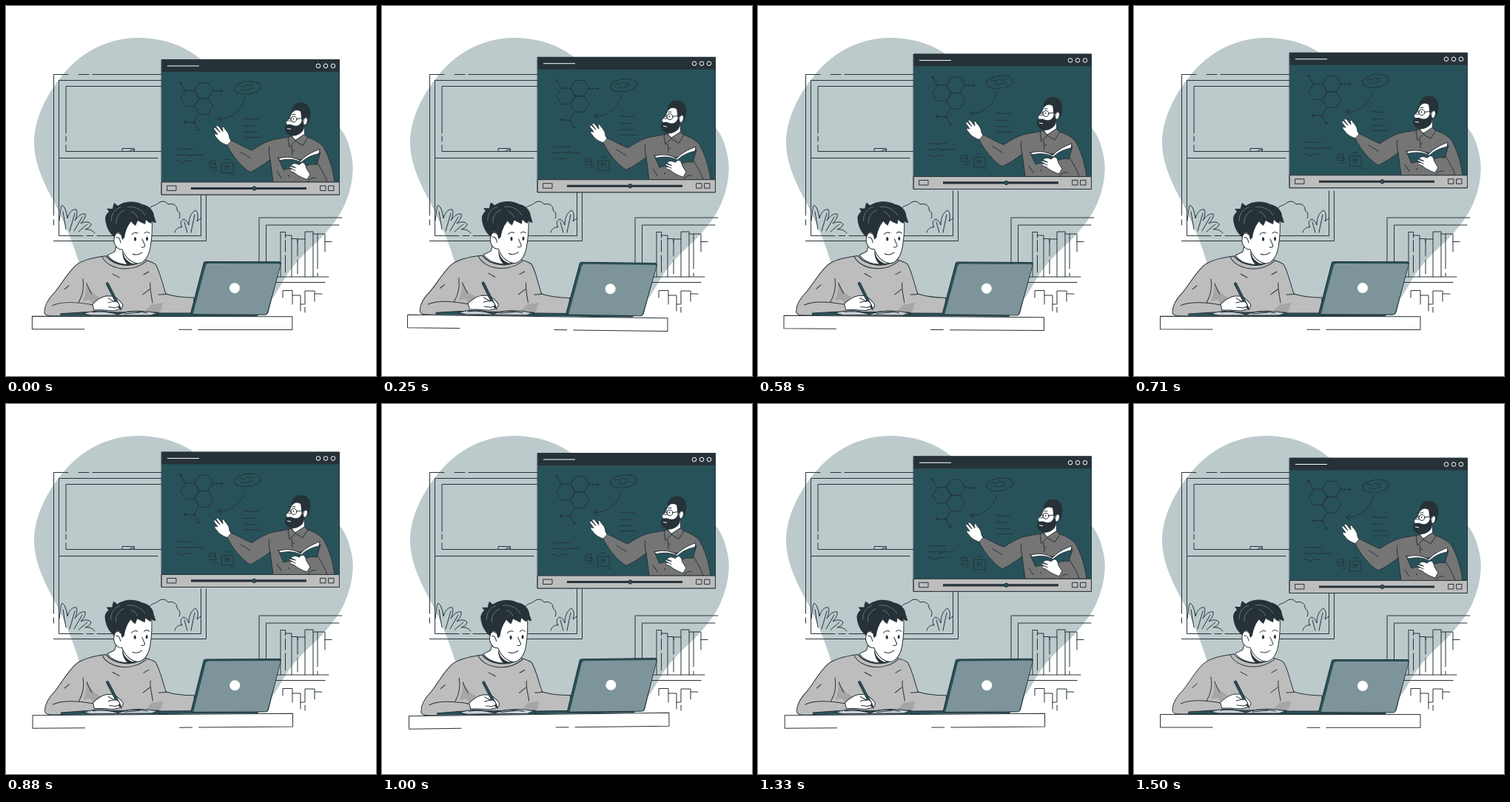
Write an HTML page that moves like this. It is 500 by 500 pixels and loops after 1540 ms.

```html
<!DOCTYPE html>
<html lang="en">
<head>
<meta charset="utf-8">
<title>Online lesson</title>
<style>
html, body { margin: 0; width: 100%; height: 100%; overflow: hidden; background: #fff; }
svg { display: block; width: 100vw; height: 100vh; }
.l { fill: none; stroke: #263238; stroke-width: 1; stroke-linecap: round; stroke-linejoin: round; }
.o { stroke: #263238; stroke-width: 1; stroke-linejoin: round; stroke-linecap: round; }
.w { fill: #fff; }
.d { fill: #263238; }
.t { fill: #28525a; }
.g { fill: #bdbdbd; }
.s { fill: #757575; }
.sh { fill: #a6a6a6; }
.p { fill: #c8d0d2; }
</style>
</head>
<body>
<svg viewBox="0 0 500 500">
  <path fill="#bccacc" d="M183 43C142 42 106 59 80 89C56 117 37 152 38 188C40 222 57 249 70 275C82 300 91 322 98 345C108 380 130 410 165 412H335C362 402 366 384 380 363C396 339 411 329 428 311C440 298 450 285 457 270C467 248 471 224 467.500 205C464 186 459 174 449 162C430 140 330 130 290 100C268 72 238 45 183 43Z"/>

  <!-- house window -->
  <g class="l">
    <path d="M210 92.5H117M112 92.5H98M84 92.5H64.5V283M64.5 289V296M64.5 317.5H270.5V250M210 100.5H71.5V310.5H104M109 310.5H118M123 310.5H263.5V250"/>
    <path d="M210 108.5H81V172M81 176V183M81 188V196.5H210M157 196V192.5H173.500V196M167 196L169 194.500H173M71.5 205.5H205"/>
    <path d="M72 290C74 280 73 272 76 269C80 272 82 279 83 287C85 279 90 274 95 275C97 280 95 286 93 290C97 284 102 280 107 281C108 286 104 290 101 294C106 291 112 291 115 295C114 299 110 301 107 302C112 301 117 303 120 307"/>
    <path d="M77 278L81 302M93 280L86 304M103 285L92 304M110 295L98 305"/>
    <path d="M193 275C196 269 202 270 205 267C210 262 217 264 219 268C226 266 232 270 231 276C235 278 236 283 234 287"/>
    <path d="M228 306C229 301 234 298 238 299C235 294 236 290 240 288C244 289 246 293 247 296C247 287 250 279 256 276C260 279 260 286 258 291L263 287M255 282L250 306M241 292L245 306"/>
  </g>

  <!-- shelf -->
  <g class="l">
    <path d="M454 286H342V353M450 296H351.5V350M345 366H436M360 373.5H431"/>
    <path d="M371 366V305.5H377.5V313M377.5 317V332M377.5 337V360M377.5 310H386V366M386 314.5H394V338M394 343V362M394 319V315H404V366M404 315V305H415V366M415 308H421V355M421 361V365M421 308H431V332M431 318.5H440"/>
    <path d="M374 394V384.5H387V403M387 391H398V412M398 403H404V385H417V399M417 389H427M404 407V414"/>
  </g>

  <!-- lesson player -->
  <g id="player">
    <rect class="o t" x="210.5" y="73" width="240" height="182.5"/>
    <rect class="d" x="210.5" y="73" width="240" height="16.5"/>
    <path d="M218 81.5H261" stroke="#fff"/>
    <g id="dots" fill="none" stroke="#fff"></g>
    <g class="l">
      <g id="rings"></g>
      <path d="M242 115.500L236 104M279 115L291 115.500M260 147L254 158L242 157.500M254 158L260 168"/>
      <ellipse cx="326.500" cy="111" rx="18" ry="8.500" transform="rotate(-7 326 111)"/>
      <path d="M315 109Q317 107 319 109T324 108T329 108T334 106M318 114Q321 112 323 114T329 113T334 112"/>
      <path d="M323 124C321 138 306 154 287 153M292 149.500L286 153L292 156"/>
      <path d="M321 153L327 152.500L330 153.500L341 153M321 162.500H336M322 171H340M322 178H344"/>
      <path d="M230 194Q234 192 237 194T244 194L254 193.500M228 202H240Q243 200 245 202T250 202L253 200M246 205L249 202H266M230 211Q233 208 236 211T243 210H252"/>
      <path d="M292 212.500H307V226H292ZM297 222V215L302 221M302 217L297 219M296 208H302M304 229H308M275 211L282 209L284 218L276 219ZM277 214H283M280 222H285"/>
    </g>
    <g class="d"><circle cx="236" cy="104" r="1.600"/><circle cx="291.500" cy="115.500" r="1.600"/><circle cx="241.500" cy="157.500" r="1.600"/><circle cx="260" cy="168" r="1.600"/><circle cx="254" cy="158" r="1.400"/><circle cx="261" cy="125.500" r="1.400"/></g>

    <!-- teacher -->
    <g>
      <path class="o w" d="M300 189C294 187 288 184 285 179C282 176 281 174 283 173L286 174L281 167C280 164 283 164 285 167L289 171L284 164C284 161 287 162 289 165L293 170L292 165C293 163 295 164 296 167C299 170 302 174 302 179L305 184Z"/>
      <path class="o s" d="M305 182.500C313 186 323 192 332 195.500C341 190 350 184 360 181.500C370 179 377 179 384 176.500L408 178C417 181 425 186 429 191C437 205 442 222 444 238.500H361L357 208C348 215 339 221 330 225C318 218 306 203 299 189Z"/>
      <path class="l" d="M357 208C355 201 355 196 356 191M330 206C325 203 320 199 317 198M420 211C424 218 430 227 434 238M408 238C411 234 413 232 418 233M386 190L387 202M366 224L372 233"/>
      <path class="o w" d="M387 166L387 178L391 182L404 178L403 162Z"/>
      <path class="o s" d="M385 176L381 179L383 191L391 183L401 189L408 178L403 174L391 182Z"/>
      <path class="o w" d="M387 142C385 149 382 154 378 158L380 162C379 170 390 174 400 166L406 158V142L396 137Z"/>
      <path class="d" d="M386 145C385 137 391 131 399 131C408 131 413 140 411 149C411 154 409 158 407 161C408 155 405 151 402 153L400 158C399 153 399 147 398 143C394 141 390 141 388 144Z"/>
      <path class="d" d="M400 155L403 160C404 169 398 175 389 176C381 176 376 171 377 164C378 161 382 160 386 161C391 163 397 164 400 155Z"/>
      <path class="o w" d="M402 155C403 150 407.500 150 407.500 155C407 160 404 163 402 160Z"/>
      <path class="l" d="M381 152C383 149 385 151 385 154C385 157 382 157 381 155M393 153L402 152M382 147L384 146M387 147L391 147"/>
      <path d="M380 166L385 167" stroke="#fff"/>
      <circle class="l" cx="389" cy="153.500" r="4"/>
      <circle class="d" cx="388.500" cy="153" r=".9"/><circle class="d" cx="383" cy="153" r=".8"/>
      <path class="o t" d="M368 206L375 222C384 219 392 219 398 222C404 216 412 213 420 215L425 198L399 208Z"/>
      <path class="o w" d="M368 206.500C379 203 391 205 398 210C404 203 413 198 424 194L423 200C413 202 405 206 399 212C390 207 381 207 371 209Z"/>
      <path class="o w" d="M385 216C388 212 392 213 396 215L400 212C404 212 405 216 406 220L411 228L407 235C400 233 393 229 390 226L385 224C382 222 384 221 387 221L383 219C382 217 384 217 387 218L391 219Z"/>
      <path class="l" d="M387 221L391 223"/>
      <g class="d"><circle cx="382" cy="230" r=".9"/><circle cx="389" cy="196" r=".9"/></g>
    </g>

    <rect class="o g" x="210.500" y="238.500" width="240" height="17"/>
    <path d="M250 247H406" stroke="#263238" stroke-width="3.200"/>
    <circle class="o t" cx="335.500" cy="247" r="2.700"/>
    <path class="l" d="M218 243.500H230V250H218ZM425 243.500H432V250H425ZM436 243.500H443V250H436Z"/>
  </g>

  <!-- student at the desk -->
  <g id="student">
    <path class="o g" d="M135 338C119 340 103 343 94 351C83 361 75 376 66 387C58 395 52 404 52 414C52 418 56 419 62 419H230L254 415V394C240 394 226 392 216 389C211 374 207 356 202 349C197 345 190 344 184 342C172 354 147 352 135 338Z"/>
    <path class="sh" d="M108 375L117 388L127 394L117 402L113 397L104 399C108 390 109 384 108 375ZM196 404L212 401L209 413H188Z"/>
    <path class="l" d="M104 369C106 382 104 391 98 401M109 375C111 380 113 385 116 389M195 374C194 383 197 392 198 401M185 390L194 383M206 390C210 390 214 390 217 389M144 362L153 367M193 359L186 363M63 405C76 399 95 400 117 404M79 383L85 378"/>
    <path class="o w" d="M149 324L147 332L137 337C146 350 170 354 185 343L178 340L165 330Z"/>
    <path class="l" d="M135 338C146 352 172 355 187 343M130 339C138 356 169 362 190 345"/>
    <path class="d" d="M157 331L160 339C163 344 168 348 175 349L165 350C160 346 157 339 157 331Z"/>
    <path class="o w" d="M156 290L197 285C198 300 197 314 195 326C193 338 187 348 178 348C169 347 161 340 157 329C150 330 145 322 146 314C147 307 151 305 155 309Z"/>
    <path class="d" d="M147 313C140 308 134 298 134 286C135 282 137 280 139 278L136 274L144 274C144 271 145 269 146 266L151 270C160 263 176 263 184 268C193 269 200 277 200 284L203 293C200 293 198 292 197 290L196 294C193 293 191 291 189 289L188 295C183 293 180 291 178 290L175 297C172 295 170 293 169 291L165 297C163 301 161 306 160 313L157 316L155 308C151 304 147 307 147 313Z"/>
    <path d="M142 291C142 281 147 274 155 272M149 294C148 286 153 279 160 276M164 272C174 270 183 275 188 283M169 278C173 279 176 282 178 286" fill="none" stroke="#7d959a" stroke-width=".7"/>
    <path class="l" d="M149 313C153 312 154 316 155 320M170 309Q173 305 178 307M187 307Q190 304 194 307M184 315L188 324Q187 327 183 326M171 335Q178 338 184 333"/>
    <ellipse class="d" cx="174.500" cy="315" rx="1.600" ry="2.700"/><ellipse class="d" cx="190.500" cy="314.500" rx="1.500" ry="2.700"/>

    <path class="o t" d="M74 416L106 414H206L209 419H74Z"/>
    <path class="o p" d="M104 416C119 410 139 412 151 417C166 411 188 411 205 415L196 418H114Z"/>
    <path class="l" d="M117 414C130 412 141 414 151 417C163 412 177 412 191 415M160 416L181 414"/>
    <path class="o w" d="M117 403C122 398 129 393 136 392L145 392C149 394 156 400 158 404C158 407 156 409 153 410L145 412L130 411L119 411Z"/>
    <path d="M137 375.500L152 405" stroke="#263238" stroke-width="4" stroke-linecap="round"/>
    <path d="M137 375.500L151 403" stroke="#28525a" stroke-width="2.200" stroke-linecap="round"/>
    <path class="d" d="M150 406L154 404L156.500 412Z"/>
    <path class="o w" d="M138 401L147 399C151 399 154 403 153 406L148 408L139 407"/>
    <path class="l" d="M138 395L147 400"/>

    <path class="o t" d="M206 415H251L341 416L339 419H206Z"/>
    <path class="o t" d="M249.500 416L267 348C267 346 269 345.500 271 345.500H368C371 345.500 372 347 371 349L354 414C353 416 352 417 350 417H252Z"/>
    <path d="M253 416L270 350.500C270.500 349 272 348 274 348H368C370 348 371 349 370.500 350L353 414C352 416 351 416.500 349 416.500Z" fill="#7d959a"/>
    <circle class="w" cx="309" cy="381" r="7"/>
    <path class="w" d="M35 419H387V437.300H35Z"/>
    <path class="l" d="M106 437H35.500V419.500H387V437.300H260M251 437.300H234"/>
  </g>
</svg>
<script>
const LOOP = 1540, LEAD = 40;
const get = id => document.getElementById(id);
const player = get('player'), student = get('student');

get('dots').innerHTML = [422, 432, 442].map(x => `<circle cx="${x}" cy="81.5" r="2.8"/>`).join('');

function hexagon(x, y) {
  const pts = [];
  for (let k = 0; k < 6; k++) {
    const a = k * Math.PI / 3;
    pts.push((x + 12.3 * Math.cos(a)).toFixed(1) + ',' + (y + 12.3 * Math.sin(a)).toFixed(1));
  }
  return `<polygon points="${pts.join(' ')}"/>`;
}
get('rings').innerHTML = hexagon(267, 115) + hexagon(248.5, 125.6) + hexagon(267, 136.3);

// Linear back-and-forth: 0 -> 1 -> 0 over one unit
const tri = u => 1 - Math.abs(1 - 2 * (u - Math.floor(u)));

function draw(ms) {
  const u = (ms + LEAD) / LOOP;
  const lift = -10 * tri(u);
  const tilt = 2 * tri(u + 0.25) - 1;
  player.setAttribute('transform', `translate(0 ${lift.toFixed(3)})`);
  student.setAttribute('transform', `rotate(${tilt.toFixed(4)} 211 351)`);
}

let start;
function tick(now) {
  if (start === undefined) start = now;
  draw((now - start) % LOOP);
  requestAnimationFrame(tick);
}
draw(0);
requestAnimationFrame(tick);
</script>
</body>
</html>
```
